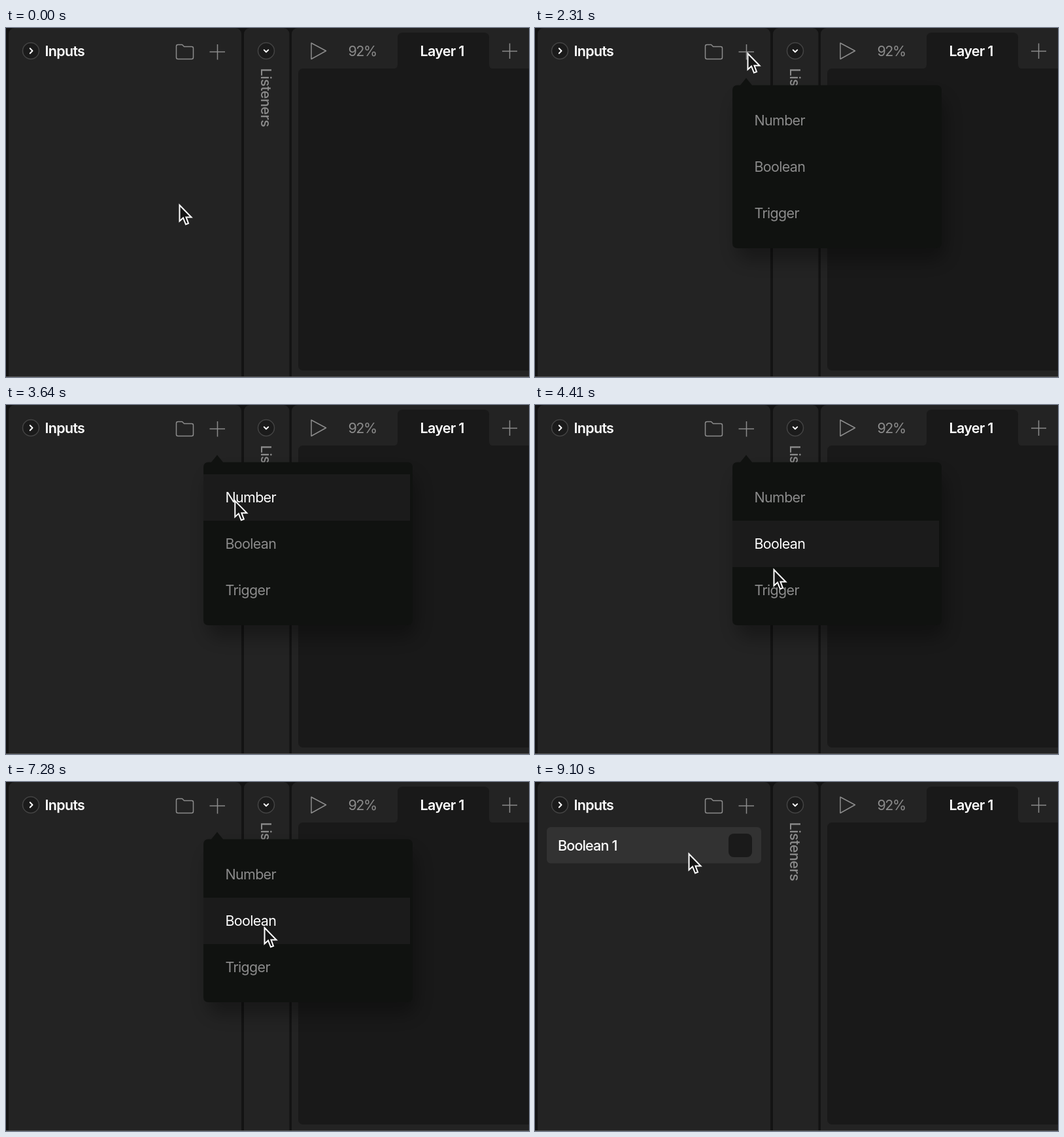
An HTML page that plays this animation: 800x534 px, repeating every 9.24 s.

```html
<!DOCTYPE html>
<html lang="en">
<head>
<meta charset="utf-8">
<title>Adding an input</title>
<style>
  html, body { margin: 0; width: 100%; height: 100%; overflow: hidden; background: #131313; }
  svg { display: block; width: 800px; height: 534px; }
  text { font: 400 21.5px Inter, "Liberation Sans", sans-serif; letter-spacing: -.7px; fill: #8b8b8b; }
  .title { font-weight: 600; fill: #fff; }
  .medium { font-weight: 500; }
  .panel { fill: #232323; }
  .stage { fill: #191919; }
  .line { fill: none; stroke: #8c8c8c; stroke-width: 1.5; stroke-linejoin: round; }
  .knob { fill: #1b1b1b; stroke: #444; stroke-width: 1.5; }
  .chevron { fill: none; stroke: #fff; stroke-width: 2; stroke-linecap: round; stroke-linejoin: round; }
  .menu { fill: #101210; }
  .item rect { fill: none; }
  .item.hover rect { fill: #1b1b1b; }
  .item.hover text { fill: #fff; }
</style>
</head>
<body>
<svg viewBox="0 0 800 534">
  <defs>
    <filter id="blur" x="-20%" y="-20%" width="140%" height="140%"><feGaussianBlur stdDeviation="13"/></filter>
  </defs>

  <!-- Panels -->
  <rect class="panel" x="4" y="0" width="356" height="550" rx="9"/>
  <rect class="panel" x="364" y="0" width="69.5" height="550" rx="9"/>
  <rect class="panel" x="437" y="0" width="380" height="550" rx="9"/>
  <rect class="stage" x="447" y="62" width="370" height="462" rx="7"/>
  <path class="stage" d="M593 62q6 0 6-6V15q0-8 8-8H731q8 0 8 8V56q0 6 6 6Z"/>

  <!-- Inputs header -->
  <circle class="knob" cx="38" cy="35" r="12.5"/>
  <path class="chevron" d="M36.8 31.3l3.7 3.7-3.7 3.7"/>
  <text class="title" x="59.5" y="43">Inputs</text>
  <path class="line" d="M260.500 28q0-2.500 2.500-2.500h6.500l3 3h11.500q2.500 0 2.500 2.500v14q0 2.500-2.500 2.500h-21q-2.500 0-2.500-2.500Z"/>
  <path class="line" d="M311.500 36.500h23.500M323.500 25v23.500"/>

  <!-- Listeners -->
  <circle class="knob" cx="398" cy="35" r="12.5"/>
  <path class="chevron" d="M394.800 33.600l3.200 3.200 3.200-3.200"/>
  <text class="medium" transform="translate(390 61.500) rotate(90)" style="letter-spacing:-.5px">Listeners</text>

  <!-- Toolbar -->
  <path class="line" d="M467 23L489.500 35 467 47.500Z"/>
  <text x="523.500" y="43" style="letter-spacing:-1.500px">92%</text>
  <text class="title" x="633.500" y="43">Layer 1</text>
  <path class="line" d="M759 35.500h23M770.500 23.500v23.500"/>

  <!-- New input -->
  <g id="row">
    <rect x="18" y="69" width="328" height="55.5" rx="6" fill="#323232"/>
    <text class="medium" x="35" y="105" style="fill:#fff;letter-spacing:-.85px">Boolean 1</text>
    <rect x="296" y="79" width="36" height="36" rx="8" fill="#1a1a1a"/>
  </g>

  <g id="menu">
    <rect x="308" y="106" width="320" height="250" rx="20" opacity=".3" filter="url(#blur)"/>
    <path class="menu" d="M310 87.500h4L323 76.500 332 87.500H614q8 0 8 8V329q0 8-8 8H310q-8 0-8-8V95.500q0-8 8-8Z"/>
  </g>

  <path id="cursor" d="M.5 1V25.500L6 20.500 10 30.500 14 29 10.500 19.500H18.500Z"
        fill="#151515" stroke="#fff" stroke-width="2"/>
  <rect y="533" width="800" height="1" fill="#555"/>
</svg>
<script>
const LOOP = 9240, STEP = 70, ROW_TOP = 106, ROW_HEIGHT = 71;
const get = id => document.getElementById(id);
const row = get('row'), menu = get('menu'), cursor = get('cursor');

const items = ['Number', 'Boolean', 'Trigger'].map((name, i) => {
  const y = ROW_TOP + i * ROW_HEIGHT;
  menu.insertAdjacentHTML('beforeend',
    `<g class="item"><rect x="302" y="${y}" width="316" height="${ROW_HEIGHT}"/>
     <text x="335.500" y="${y + 43}">${name}</text></g>`);
  return menu.lastElementChild;
});

// Cursor path: time, x, y
const path = [
  [0, 265, 270], [980, 265, 270], [1680, 343, 80], [1960, 325, 38],
  [2800, 325, 38], [2940, 335, 64], [3290, 348, 128],
  [3500, 348, 128], [3920, 355, 196],
  [4130, 355, 196], [4410, 365, 251], [4620, 369, 280],
  [5180, 369, 280], [5670, 395, 222],
  [8050, 395, 222], [8330, 158, 120.5], [8610, 122, 106],
  [8680, 122, 106], [9100, 235, 109], [LOOP, 235, 109]
];

// Speed at a point: zero next to a pause, else the mean over both neighbours
function speed(i, axis) {
  const a = path[i - 1], p = path[i], b = path[i + 1];
  if (!a || !b || a[axis] === p[axis] || b[axis] === p[axis]) return 0;
  return (b[axis] - a[axis]) / (b[0] - a[0]);
}

function position(t) {
  const i = Math.max(1, path.findIndex(p => p[0] >= t));
  const a = path[i - 1], b = path[i], span = b[0] - a[0], u = (t - a[0]) / span;
  return [1, 2].map(axis => {
    const ease = u * u * (3 - 2 * u);
    return a[axis] + (b[axis] - a[axis]) * ease
      + span * u * (1 - u) * ((1 - u) * speed(i - 1, axis) - u * speed(i, axis));
  });
}

const ramp = (t, from, to) => {
  const u = Math.min(1, Math.max(0, (t - from) / (to - from)));
  return u * (2 - u);
};

function draw(now) {
  const t = Math.floor(now % LOOP / STEP) * STEP;
  cursor.setAttribute('transform', `translate(${position(t)})`);
  // The highlight trails the cursor by one step
  const hovered = Math.floor((position(Math.max(0, t - STEP))[1] - ROW_TOP) / ROW_HEIGHT);
  items.forEach((item, i) => item.classList.toggle('hover', i === hovered));
  menu.setAttribute('opacity', ramp(t, 1960, 2310) * (1 - ramp(t, 7280, 7560)));
  row.setAttribute('opacity', ramp(t, 7280, 7630));
}

const start = performance.now();
function tick() {
  draw(performance.now() - start);
  requestAnimationFrame(tick);
}
tick();
</script>
</body>
</html>
```
